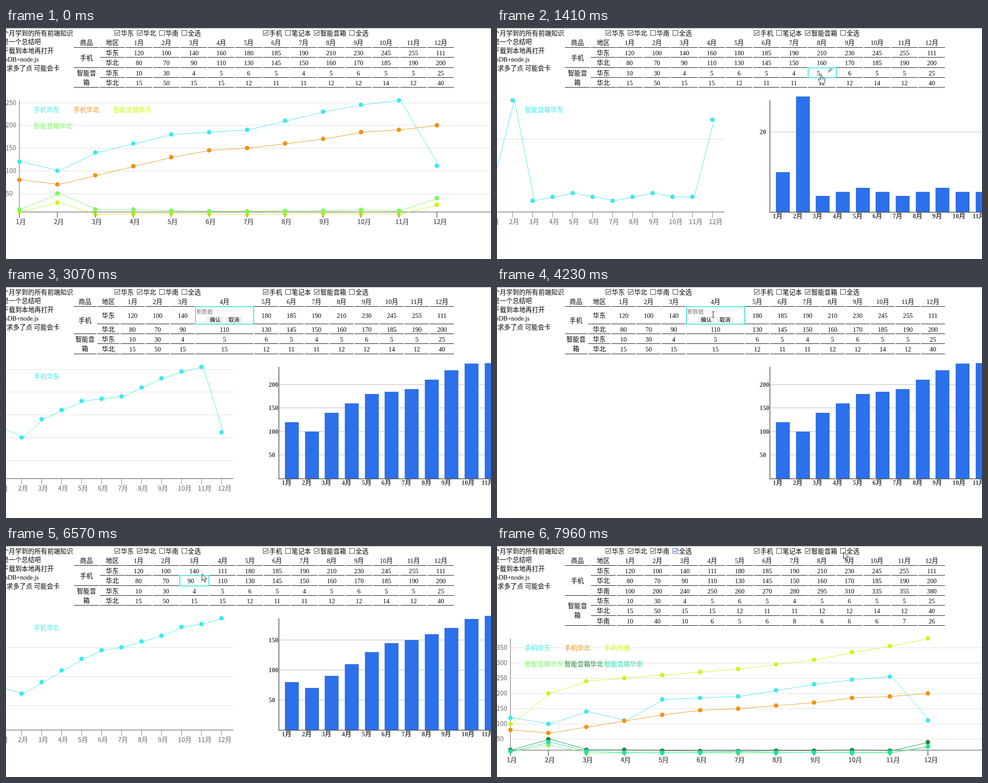
These frames come from a looping animation (1085 by 516 pixels, 8000 ms). An HTML page with a canvas:

```html
<!DOCTYPE html>
<html lang="zh-CN">
<head>
<meta charset="utf-8">
<style>
html, body { margin: 0; width: 1085px; height: 516px; overflow: hidden; background: #fff; }
canvas { display: block; }
</style>
</head>
<body>
<canvas id="stage" width="1085" height="516"></canvas>
<script>
const g = document.getElementById('stage').getContext('2d');
const LOOP = 8000, STEP = 78, CHART_LAG = 140;
const ENTER = 90, EDIT = 3070, FOCUS = 3370, TYPE = 4380, CONFIRM = 5010, LEAVE = 6570, CHECK = 7420;
const CJK = '"Noto Sans CJK SC", "Noto Sans CJK", sans-serif';
const SERIF = '"Liberation Serif", ' + CJK;
const BODY = '14.4px ' + SERIF, CHART = '14.4px ' + CJK, BARS = 'bold 14.4px ' + SERIF, SMALL = '12px ' + CJK;
const COLORS = ['#3de9ef', '#f29212', '#c6f71a', '#78fb5c', '#208a38', '#1fdfb2'];
const PRODUCTS = ['手机', '智能音箱'], REGIONS = ['华东', '华北', '华南'];
const MONTHS = [...Array(12)].map((_, i) => i + 1 + '月');
const SALES = [
  [[120, 100, 140, 160, 180, 185, 190, 210, 230, 245, 255, 111],
   [80, 70, 90, 110, 130, 145, 150, 160, 170, 185, 190, 200],
   [100, 200, 240, 250, 260, 270, 280, 295, 310, 335, 355, 380]],
  [[10, 30, 4, 5, 6, 5, 4, 5, 6, 5, 5, 25],
   [15, 50, 15, 15, 12, 11, 11, 12, 12, 14, 12, 40],
   [10, 40, 10, 6, 5, 6, 8, 6, 6, 6, 7, 26]]
];

// Mouse stops: departure, arrival, x, y
const STOPS = [
  [0, 0, 860, 150], [ENTER, 550, 735, 58], [780, 1010, 732, 83], [1090, 1410, 725, 103],
  [1810, 1880, 718, 125], [2280, 2520, 457, 76], [2660, 2760, 483, 50], [FOCUS, FOCUS, 483, 61],
  [4550, 4780, 470, 73], [LEAVE, LEAVE, 438, 62], [6640, 6800, 404, 9], [6950, 7100, 399, 11],
  [7500, 7730, 826, 11], [7880, 7960, 775, 13]
];
const SHAPES = {
  arrow: new Path2D('M0 0v15l3.5-3 2.5 6 2.5-1-2.5-6h5z'),
  hand: new Path2D('M-2 1q1.5-2 3 0v7l2-.5 1.5 1 2 0 1.5 1.5v5l-2 5.5h-7l-6-8.5q0-2.5 2.5-1.5l2.5 2z'),
  beam: new Path2D('M-3-6.5h2l1 1 1-1h2M0-5.5v11M-3 6.5h2l1-1 1 1h2')
};

// The mouse advances in even steps from one stop to the next.
function mouseAt(t) {
  const i = Math.max(1, STOPS.findLastIndex(stop => t >= stop[0]));
  const [, , x0, y0] = STOPS[i - 1], [start, end, x1, y1] = STOPS[i];
  const steps = Math.round((end - start) / STEP) + 1;
  const passed = steps > 1 ? Math.floor((t - start) / (end - start) * (steps - 1) + 1e-6) : 0;
  const k = t < start ? 0 : Math.min(1, (passed + 1) / steps);
  return { x: x0 + (x1 - x0) * k, y: y0 + (y1 - y0) * k };
}
function cellAt({ x, y }) {
  const row = Math.floor((y - 39) / 22.3), col = Math.floor((x - 273.7) / 61.4);
  return { row: row >= 0 && row < 4 && col >= 0 && col < 12 ? row : -1, col };
}

function text(s, x, y, font = BODY, color = '#000', align = 'left') {
  g.font = font;
  g.fillStyle = color;
  g.textAlign = align;
  g.fillText(s, x, y + 5);
}
function box(x, y, w, h, color) {
  g.fillStyle = color;
  g.fillRect(x, y, w, h);
}
function line(points, color, width = 1) {
  g.strokeStyle = color;
  g.lineWidth = width;
  g.beginPath();
  points.forEach(([x, y]) => g.lineTo(x, y));
  g.stroke();
}

function drawPage(t) {
  box(0, 0, 1085, 1, '#999');
  [['这个月学到的所有前端知识', 150], ['算是一个总结吧', 78], ['请下载到本地再打开', 107],
   ['MongoDB+node.js', 73], ['请求多了点 可能会卡', 120]]
    .forEach(([s, right], i) => text(s, right, 12 + i * 19.4, BODY, '#000', 'right'));
  drawChecks(243, [...REGIONS, '全选'], t >= CHECK ? REGIONS.concat('全选') : ['华东', '华北'], t >= 7270);
  drawChecks(575, ['手机', '笔记本', '智能音箱', '全选'], PRODUCTS);
}

function drawChecks(x, labels, checked, focused) {
  labels.forEach(s => {
    const color = focused && s === '全选' ? '#24539a' : '#333';
    g.strokeStyle = color;
    g.lineWidth = 1;
    g.strokeRect(Math.round(x) + .5, 5.5, 11, 11);
    if (checked.includes(s)) line([[x + 2.5, 11], [x + 5, 13.5], [x + 10, 8]], color, 1.2);
    text(s, x + 14, 12);
    x += 21.3 + s.length * 14.35;
  });
}

function drawTable(t, rows, hover, editing) {
  const hovering = hover.row >= 0;
  const perProduct = rows.length / 2;
  const start = editing ? 256 : hovering ? 267 : 267.7;
  const digits = hovering ? String(rows[hover.row].values[hover.col]).length : 0;
  const extra = editing ? 74.7 : Math.min(6, digits * 2.5);
  const pitch = (1004.3 - start - extra) / 12;
  const grow = editing ? 16.3 : 0;
  const heads = editing ? [{ x: 152, w: 49.5 }, { x: 204, w: 50 }] : [{ x: 152, w: 56 }, { x: 209.7, w: 56 }];
  const columns = [...heads, ...MONTHS.map((_, i) => ({
    x: start + i * pitch + (hovering && i > hover.col ? extra : 0),
    w: pitch - 2 + (hovering && i === hover.col ? extra : 0)
  }))];
  const rule = r => r ? Math.round(43 + r * 22.3 + grow) : 43;
  const put = (s, c, y, dx = 0) => text(s, c.x + c.w / 2 + dx, y, BODY, '#000', 'center');
  const under = (c, y) => box(Math.round(c.x), y, Math.round(c.x + c.w) - Math.round(c.x), 1, '#000');

  ['商品', '地区', ...MONTHS].forEach((s, i) => {
    put(s, columns[i], 33);
    under(columns[i], 43);
  });
  PRODUCTS.forEach((name, p) => {
    const top = rule(p * perProduct), bottom = rule((p + 1) * perProduct);
    const parts = name.match(/.{1,3}/g);
    parts.forEach((s, i) => put(s, heads[0], (top + bottom) / 2 + 1 + (i - (parts.length - 1) / 2) * 21));
    under(heads[0], bottom);
  });
  rows.forEach((row, r) => {
    const top = rule(r), bottom = rule(r + 1), mid = (top + bottom) / 2 + 1.5;
    put(row.region, heads[1], mid);
    under(heads[1], bottom);
    row.values.forEach((v, i) => {
      const c = columns[i + 2];
      if (r !== hover.row || i !== hover.col) {
        put(v, c, mid);
        under(c, bottom);
        return;
      }
      if (editing) drawEditor(t, c);
      else {
        put(v, c, mid, -7.5);
        if (t < LEAVE) drawPencil(c.x + c.w - 12, top + 6);
      }
      g.strokeStyle = '#46e3e0';
      g.lineWidth = 2;
      g.strokeRect(Math.round(c.x), top + 1, Math.round(c.w + 1), bottom - top);
    });
  });
  return rule(rows.length);
}

function drawPencil(x, y) {
  line([[x - 3, y + 3], [x + 3, y - 3]], '#8ba3b8', 4);
  line([[x - 5, y + 5], [x - 3, y + 3]], '#7a8b98', 2);
  line([[x + 3.5, y - 3.5], [x + 5, y - 5]], '#7796b8', 4);
}

function drawEditor(t, c) {
  const typed = '111'.slice(0, t < TYPE ? 0 : 1 + Math.floor((t - TYPE) / 120));
  text(typed || '新数据', c.x + 1.5, 55, SMALL, typed ? '#000' : '#757575');
  if (t >= 3680 && t < 4230) box(426, 47, 1, 16, '#000');
  ['确认', '取消'].forEach((s, i) => {
    box(449 + i * 42, 66, 38, 15, '#efefef');
    text(s, 468 + i * 42, 73, SMALL, '#000', 'center');
  });
}

function gridValues(max) {
  const step = max >= 100 ? 50 : 20;
  return [...Array(Math.ceil(max / step) - 1)].map((_, i) => (i + 1) * step);
}

function drawLines(rows, top, wide) {
  const x0 = wide ? 30 : -9.7, pitch = wide ? 84.9 : 44.7, right = wide ? 1085 : 508.5;
  const base = Math.round(top + 249.5);
  const max = Math.max(...rows.flatMap(r => r.values));
  const px = i => x0 + i * pitch, py = v => top + 259 - v * 259 / max;
  gridValues(max).forEach(v => {
    box(x0, Math.round(py(v)), right - x0, 1, '#dcdcdc');
    if (wide) text(v, -1, py(v), CHART, '#666');
  });
  line([[right, base], [x0, base], [x0, top]], '#777', 1.3);
  rows.forEach((row, n) => {
    const color = COLORS[n];
    MONTHS.forEach((m, i) => {
      line([[px(i), base], [px(i), base + 13]], '#777');
      text(m, px(i) - 8, base + 22, CHART, '#666');
    });
    line(row.values.map((v, i) => [px(i) + 4, py(v)]), color);
    row.values.forEach((v, i) => {
      g.fillStyle = color;
      g.beginPath();
      g.arc(px(i), py(v), 5, 0, 7);
      g.fill();
    });
    text(row.product + row.region, 62 + n % 3 * 89, top + 21.5 + Math.floor(n / 3) * 36, CHART, color);
  });
}

function drawBars({ values }, top) {
  const base = Math.round(top + 249.5), max = Math.max(...values);
  const py = v => Math.round(base - v * 268 / max);
  g.save();
  g.beginPath();
  g.rect(580, Math.round(top - 9), 505, 320);
  g.clip();
  gridValues(max).forEach(v => {
    line([[610, py(v)], [1085, py(v)]], '#ccc', 1.3);
    text(v, 587.5, py(v), BARS, '#444');
  });
  values.forEach((v, i) => {
    const x = Math.round(624 + i * 44.65);
    box(x, py(v), 31, base - py(v), '#2d70eb');
    text(MONTHS[i], x - 7, base + 9, BARS, '#444');
  });
  line([[610.5, top], [610.5, base + .5], [1085, base + .5]], '#444', 1.5);
  g.restore();
}

function drawCursor(t, hovering, editing) {
  if (t < ENTER || editing && t < FOCUS) return;
  const kind = editing ? (t < 4620 ? 'beam' : 'arrow') : hovering && t < LEAVE ? 'hand' : 'arrow';
  const { x, y } = mouseAt(t);
  g.save();
  g.translate(Math.round(x) + .5, Math.round(y) + .5);
  g.fillStyle = '#fff';
  g.strokeStyle = '#000';
  g.lineWidth = 1;
  if (kind !== 'beam') g.fill(SHAPES[kind]);
  g.stroke(SHAPES[kind]);
  if (kind === 'hand') line([[3.5, 9], [3.5, 13]], '#000', .8);
  g.restore();
}

function draw(t) {
  const regions = REGIONS.slice(0, t >= CHECK + STEP ? 3 : 2);
  const rows = PRODUCTS.flatMap((product, p) => regions.map((region, r) => (
    { product, region, values: [...SALES[p][r]] }
  )));
  if (t >= CONFIRM) rows[0].values[3] = 111;
  const editing = t >= EDIT && t < CONFIRM;
  const seen = editing ? EDIT - 1 : t;
  const hover = cellAt(mouseAt(seen));
  // The charts follow the hovered row a moment later.
  const charted = hover.row < 0 ? -1 : cellAt(mouseAt(seen - CHART_LAG)).row;

  box(0, 0, 1085, 516, '#fff');
  drawPage(t);
  const top = drawTable(t, rows, hover, editing) + 29.5;
  if (charted < 0) drawLines(rows, top, true);
  else {
    if (!editing || t < EDIT + 70) drawLines([rows[charted]], top, false);
    drawBars(rows[charted], top);
  }
  drawCursor(t, hover.row >= 0, editing);
}

function tick() {
  draw(performance.now() % LOOP);
  requestAnimationFrame(tick);
}
tick();
</script>
</body>
</html>
```
